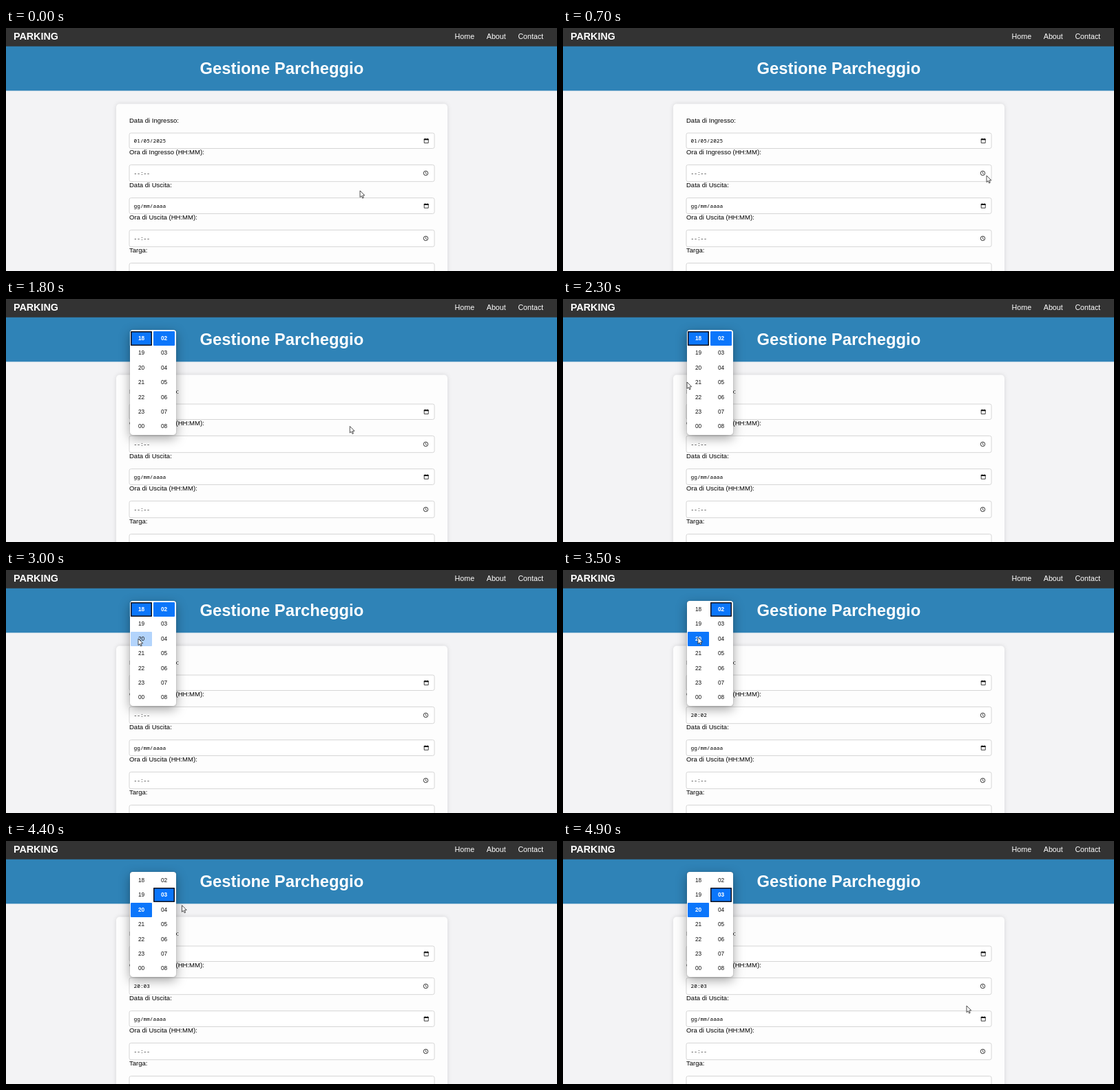
These frames come from a looping animation (800x354 px, 5 s). An HTML page:

```html
<!DOCTYPE html>
<html lang="it">
<head>
<meta charset="utf-8">
<title>Gestione Parcheggio</title>
<style>
html, body { margin: 0; width: 100%; height: 100%; overflow: hidden; background: #f3f3f5; }
body { position: relative; font-family: "Liberation Sans", Arial, sans-serif; }
svg { position: absolute; left: 0; top: 0; }
.mono { font: 500 7.75px "Noto Sans Mono", monospace; }
#picker {
  position: absolute; left: 179.5px; top: 45px; width: 67px; height: 153px; border-radius: 4px;
  box-shadow: 0 0 1px rgba(0,0,0,.6), 0 5px 16px rgba(0,0,0,.36);
}
.cell {
  position: absolute; box-sizing: border-box; width: 31px; height: 21px; border-radius: 1px;
  font-size: 8.3px; line-height: 21.6px; text-align: center; color: #101010;
}
.cell.hover { background: #b3d4fc; }
.cell.on { background: #0b76fb; color: #fff; font-weight: bold; }
.cell.focus { box-shadow: inset 0 0 0 1.5px #101018; }
</style>
</head>
<body>
<svg id="page" width="800" height="354" viewBox="0 0 800 354"></svg>
<div id="picker"></div>
<svg width="800" height="354" viewBox="0 0 800 354">
  <path id="cursor" d="M0 0V9.6L2.2 7.6 3.7 11 5.2 10.3 3.8 7 6.7 6.8Z" fill="#fff" stroke="#222" stroke-width=".8"/>
</svg>
<script>
const $ = id => document.getElementById(id);
const text = (x, y, s, size, extra = '') => `<text x="${x}" y="${y}" font-size="${size}" ${extra}>${s}</text>`;
const white = 'fill="#fff"', bold = white + ' font-weight="bold"';

const calendar = y => `<path d="M607.2 ${y - 2.4}h6v5.6h-6z" fill="none" stroke="#111" stroke-width=".8"/>
  <path d="M606.8 ${y - 2.8}h6.8v1.8h-6.8zM608 ${y - 3.5}h1v1h-1zM611.4 ${y - 3.5}h1v1h-1z" fill="#111"/>`;
const clock = y => `<circle cx="609.5" cy="${y}" r="3.2" fill="none" stroke="#111" stroke-width=".85"/>
  <path d="M609.4 ${y - 2}v2.2l1.5 1" fill="none" stroke="#111" stroke-width=".75"/>`;

// label, label baseline, box top, box height, value, icon
const fields = [
  ['Data di Ingresso:', 138, 153, 22.5, '01/05/2025', calendar],
  ['Ora di Ingresso (HH:MM):', 184.3, 199.3, 24.4, '--:--', clock],
  ['Data di Uscita:', 232.3, 247.5, 23, 'gg/mm/aaaa', calendar],
  ['Ora di Uscita (HH:MM):', 279, 294.3, 24.4, '--:--', clock],
  ['Targa:', 327.3, 342.5, 24, '', () => '']
];

$('page').innerHTML = `
  <defs><filter id="soft" x="-10%" y="-10%" width="120%" height="120%"><feGaussianBlur stdDeviation="3"/></filter></defs>
  <rect width="800" height="91.4" fill="#2f83b7"/>
  <rect width="800" height="26.7" fill="#333"/>
  ${text(11, 17.3, 'PARKING', 14.3, bold)}
  ${text(651.6, 16.2, 'Home', 10.7, white)}
  ${text(697.8, 16.2, 'About', 10.7, white)}
  ${text(743.4, 16.2, 'Contact', 10.7, white)}
  ${text(400.4, 67, 'Gestione Parcheggio', 23.76, bold + ' text-anchor="middle"')}
  <rect x="160" y="110.5" width="481" height="270" rx="5" opacity=".12" filter="url(#soft)"/>
  <rect x="160" y="110.5" width="481" height="270" rx="5" fill="#fdfdfd"/>` +
  fields.map(([label, base, top, h, value, icon], i) =>
    text(179, base, label, 9.5) +
    `<rect x="179" y="${top}" width="443" height="${h}" rx="2.5" fill="#fff" stroke="#ccc" stroke-width=".8"/>
     <text id="value${i}" class="mono" x="185.6" y="${top + h / 2 + 2.9}">${value}</text>` +
    icon(top + h / 2)).join('');

const ROWS = 7, PITCH = 21.4;
const two = n => String(n).padStart(2, '0');
const cells = [];
for (let col = 0; col < 2; col++)
  for (let row = 0; row < ROWS; row++) {
    const el = document.createElement('div');
    const x = 1.5 + col * 33, y = 2 + row * PITCH;
    el.textContent = two(col ? row + 2 : (row + 18) % 24);
    el.style.cssText = `left:${x}px;top:${y}px`;
    $('picker').append(el);
    cells.push({ el, col, row, x: x + 179.5, y: y + 45 });
  }

// time, x, y of the pointer tip
const path = [
  [0, 514, 237], [600, 615, 215], [1000, 615, 215], [1300, 611, 208], [1600, 611, 208],
  [2200, 180, 121], [2400, 180, 121], [2900, 192, 100], [3400, 192, 100],
  [3900, 229, 82], [4300, 229, 82], [4900, 586, 240], [5000, 586, 240]
];
const OPEN = 1400, SHOWN = 1500, PICK_HOUR = 3300, PICK_MINUTE = 4200;

function pointer(t) {
  const i = path.findIndex(p => p[0] > t);
  const [t0, x0, y0] = path[i - 1], [t1, x1, y1] = path[i];
  const u = (t - t0) / (t1 - t0), k = u * u * (3 - 2 * u);
  return [x0 + (x1 - x0) * k, y0 + (y1 - y0) * k];
}

function draw(t) {
  const [px, py] = pointer(t);
  $('cursor').setAttribute('transform', `translate(${px} ${py})`);

  const shown = t >= SHOWN, hourSet = t >= PICK_HOUR, minuteSet = t >= PICK_MINUTE;
  $('picker').style.display = t >= OPEN ? 'block' : 'none';
  $('picker').style.background = shown ? '#fff' : 'rgba(0,0,0,.04)';
  const picked = [hourSet ? 2 : 0, minuteSet ? 1 : 0];
  const focusCol = hourSet ? 1 : 0;
  for (const { el, col, row, x, y } of cells) {
    const on = row === picked[col];
    const hover = px >= x && px < x + 31 && py >= y && py < y + 21;
    el.className = 'cell' + (on ? ' on' : hover ? ' hover' : '') + (on && col === focusCol ? ' focus' : '');
    el.style.visibility = shown ? 'visible' : 'hidden';
  }
  $('value1').textContent = hourSet ? '20:0' + (minuteSet ? 3 : 2) : '--:--';
}

const start = performance.now();
function tick() {
  const t = (performance.now() - start) % 5000;
  draw(Math.floor(t / 100) * 100);
  requestAnimationFrame(tick);
}
tick();
</script>
</body>
</html>
```
